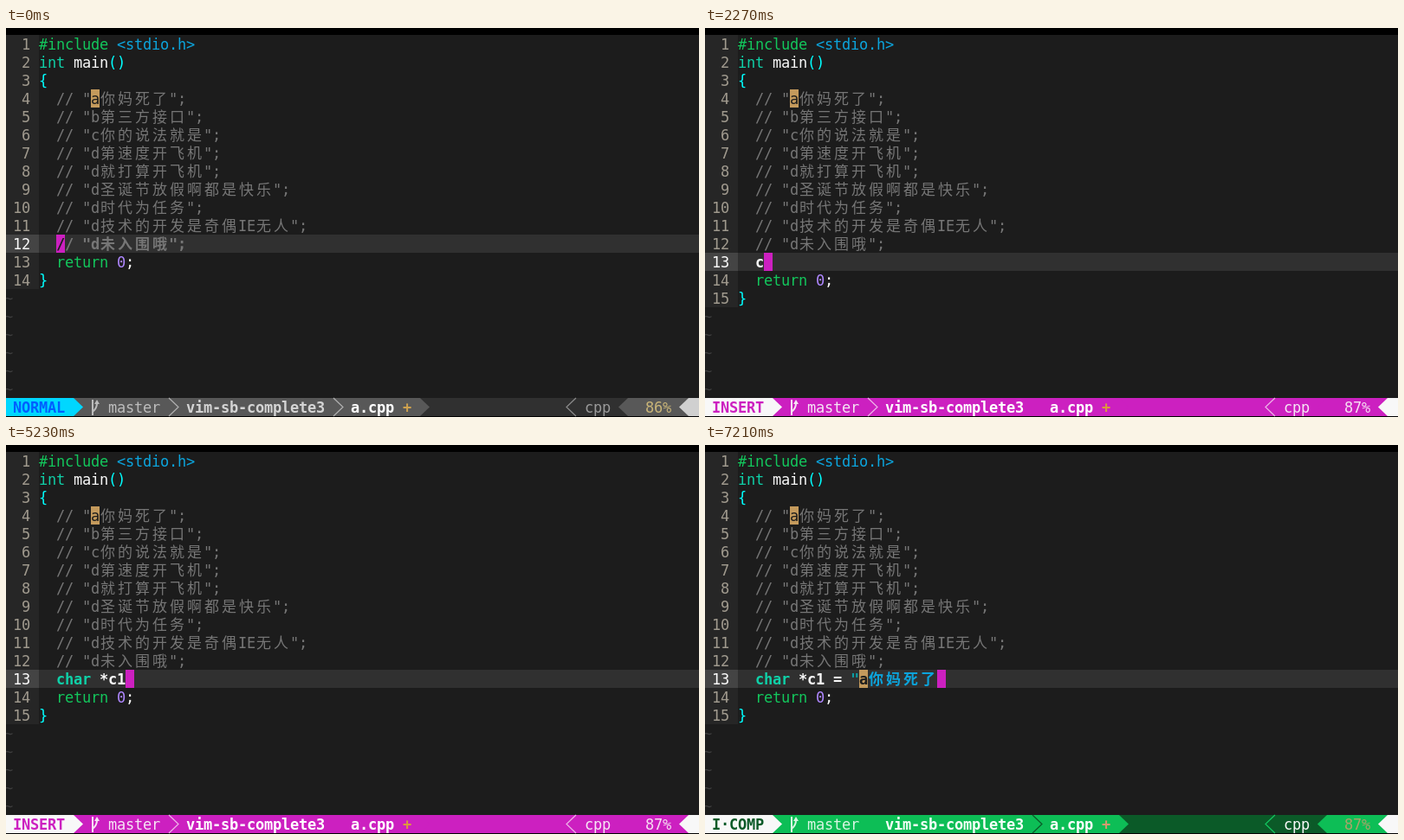
An HTML page with a canvas that plays this animation: 800 px wide and 450 px high, repeating every 8000 ms.

```html
<!DOCTYPE html>
<html lang="zh-CN">
<head>
<meta charset="utf-8">
<title>Editor session</title>
<style>
  html, body { margin: 0; width: 800px; height: 450px; overflow: hidden; background: #000; }
  canvas { display: block; }
</style>
</head>
<body>
<canvas id="stage" width="800" height="450"></canvas>
<script>
const ctx = document.getElementById('stage').getContext('2d');
const LOOP = 8000, CELL = 10, ROW = 21, TOP = 8, LEFT = 38, BAR = 428, BASELINE = 17;
const FONT = '17px "DejaVu Sans Mono", "Noto Sans CJK SC", "Noto Sans CJK", monospace';

const C = {
  bg: '#1c1c1c', gutter: '#262626', line: '#303030', lineNo: '#444444',
  number: '#a09a8e', white: '#f8f8f8', comment: '#767676', tilde: '#3e3e3e',
  green: '#13c65c', teal: '#0fd0a8', blue: '#0ca4dc', quote: '#0c9da4',
  cyan: '#00ffff', purple: '#af87ff', cursor: '#cc20c0', match: '#c49a5c'
};

const HEAD = [
  [['#include ', C.green], ['<stdio.h>', C.blue]],
  [['int ', C.teal], ['main', C.white], ['()', C.cyan]],
  [['{', C.cyan]],
  [['  // "', C.comment], ['a', C.bg, C.match], ['你妈死了";', C.comment]],
  ...['b第三方接口', 'c你的说法就是', 'd第速度开飞机', 'd就打算开飞机',
      'd圣诞节放假啊都是快乐', 'd时代为任务', 'd技术的开发是奇偶IE无人', 'd未入围哦']
    .map(s => [[`  // "${s}";`, C.comment]])
];
const TAIL = [
  [['  return ', C.green], ['0', C.purple], [';', C.white]],
  [['}', C.cyan]]
];

// [start ms, text of the edited line]
const TYPING = [
  [320, '// '], [740, '//'], [940, '/'], [1090, ''],
  [2270, 'c'], [2340, 'ch'], [2400, 'cha'], [2550, 'char'], [2640, 'char '],
  [3270, 'char *'], [3830, 'char '], [4180, 'char *'], [4370, 'char *c'],
  [5230, 'char *c1'], [5600, 'char *c1 '], [5680, 'char *c1 ='],
  [5750, 'char *c1 = '], [6670, 'char *c1 = "'], [6900, 'char *c1 = "a'],
  [7210, 'char *c1 = "a你妈死了']
];

const MODES = {
  normal: {
    label: 'NORMAL', tag: '#00d7ff', tagText: '#005fff', seg: '#585858', mid: '#303030',
    branch: '#bcbcbc', dir: '#d4d4d4', sep1: '#b0b0b0', sep2: '#b0b0b0',
    plus: '#cfa24e', type: '#9a9a9a', sep3: '#8c8c8c', pct: '#c8b478', end: '#d0d0d0'
  },
  insert: {
    label: 'INSERT', tag: '#f8f8f8', tagText: '#cc20c0', seg: '#cc20c0', mid: '#cc20c0',
    branch: '#f6e4f4', dir: '#ffffff', sep1: '#eeb4e8', sep2: '',
    plus: '#dc9a3c', type: '#f6e4f4', sep3: '#eeb4e8', pct: '#f6dcf2', end: '#f8f8f8'
  },
  complete: {
    label: 'I·COMP', tag: '#f8f8f8', tagText: '#0b5a28', seg: '#0dbe56', mid: '#0b5a28',
    branch: '#d8f6e2', dir: '#f4fff8', sep1: '', sep2: '#0b5a28',
    plus: '#d89a70', type: '#f8f8f8', sep3: '#13c860', pct: '#a8a468', end: '#f8f8f8'
  }
};

const isWide = ch => ch > '\u2fff';

function rect(x, y, w, h, color) {
  ctx.fillStyle = color;
  ctx.fillRect(x, y, w, h);
}

// Writes on the cell grid and returns the next free x.
function put(text, x, top, color, bold, bg) {
  ctx.font = (bold ? 'bold ' : '') + FONT;
  for (const ch of text) {
    const wide = isWide(ch), w = wide ? 2 * CELL : CELL;
    if (bg) rect(x, top, w, ROW, bg);
    ctx.fillStyle = color;
    ctx.fillText(ch, wide ? x + 1 : x, top + BASELINE);
    x += w;
  }
  return x;
}

function colorize(text) {
  if (text.startsWith('//')) return [[text, C.comment]];
  if (!text.startsWith('char')) return [[text, C.white]];
  const [code, str] = text.slice(4).split('"');
  const parts = [['char', C.teal], [code, C.white]];
  if (str !== undefined) {
    parts.push(['"', C.quote], [str.slice(0, 1), C.bg, C.match], [str.slice(1), C.blue]);
  }
  return parts;
}

function drawLine(parts, index, active) {
  const top = TOP + index * ROW;
  rect(0, top, LEFT, ROW, active ? C.lineNo : C.gutter);
  if (active) rect(LEFT, top, 800 - LEFT, ROW, C.line);
  put(String(index + 1).padStart(3), -2, top, active ? C.white : C.number);
  let x = LEFT;
  for (const [text, color, bg] of parts) x = put(text, x, top, color, active, bg);
  return x;
}

// Filled or thin chevron; dir 1 points right, -1 left.
function chevron(x, dir, color, thin) {
  if (!color) return;
  const base = dir > 0 ? x : x + CELL, tip = base + dir * (CELL + 1);
  ctx.beginPath();
  ctx.moveTo(base, BAR);
  ctx.lineTo(tip, BAR + ROW / 2);
  ctx.lineTo(base, BAR + ROW);
  if (thin) {
    ctx.strokeStyle = color;
    ctx.lineWidth = 1.2;
    ctx.stroke();
  } else {
    ctx.fillStyle = color;
    ctx.fill();
  }
}

function branchIcon(color) {
  ctx.strokeStyle = ctx.fillStyle = color;
  ctx.lineWidth = 2;
  ctx.beginPath();
  ctx.moveTo(100, BAR + 2);
  ctx.lineTo(100, BAR + 20);
  ctx.moveTo(100, BAR + 16);
  ctx.quadraticCurveTo(105, BAR + 12, 105, BAR + 6);
  ctx.stroke();
  ctx.beginPath();
  ctx.moveTo(102, BAR + 7);
  ctx.lineTo(105, BAR + 2);
  ctx.lineTo(108, BAR + 7);
  ctx.fill();
}

function statusBar(m, percent) {
  rect(0, BAR, 800, ROW, m.mid);
  rect(78, BAR, 400, ROW, m.seg);
  chevron(478, 1, m.seg);
  rect(0, BAR, 78, ROW, m.tag);
  chevron(78, 1, m.tag);
  put(m.label, 8, BAR, m.tagText, true);
  branchIcon(m.branch);
  put('master', 118, BAR, m.branch);
  chevron(188, 1, m.sep1, true);
  put('vim-sb-complete3', 208, BAR, m.dir, true);
  chevron(378, 1, m.sep2, true);
  put('a.cpp', 398, BAR, '#ffffff', true);
  put('+', 458, BAR, m.plus, true);
  chevron(648, -1, m.sep3, true);
  put('cpp', 668, BAR, m.type);
  chevron(708, -1, m.seg);
  rect(718, BAR, 82, ROW, m.seg);
  put(percent, 738, BAR, m.pct);
  chevron(778, -1, m.end);
  rect(788, BAR, 12, ROW, m.end);
}

function draw(t) {
  const edit = TYPING.filter(s => s[0] <= t).pop();
  const lines = edit
    ? [...HEAD, [['  ', C.white], ...colorize(edit[1])], ...TAIL]
    : [...HEAD, ...TAIL];
  const active = edit ? 12 : 11;

  rect(0, 0, 800, 450, '#000');
  rect(0, TOP, 800, BAR - TOP, C.bg);
  let end = 0;
  lines.forEach((parts, i) => {
    const x = drawLine(parts, i, i === active);
    if (i === active) end = x;
  });
  for (let i = lines.length; i < 20; i++) put('~', -2, TOP + i * ROW, C.tilde);

  const top = TOP + active * ROW;
  if (edit) rect(end, top, CELL, ROW, C.cursor);
  else put('/', 58, top, C.bg, true, C.cursor);

  const mode = !edit ? 'normal' : t < 7210 ? 'insert' : 'complete';
  statusBar(MODES[mode], edit ? '87%' : '86%');
}

const start = performance.now();
function tick() {
  draw((performance.now() - start) % LOOP);
  requestAnimationFrame(tick);
}
tick();
</script>
</body>
</html>
```
